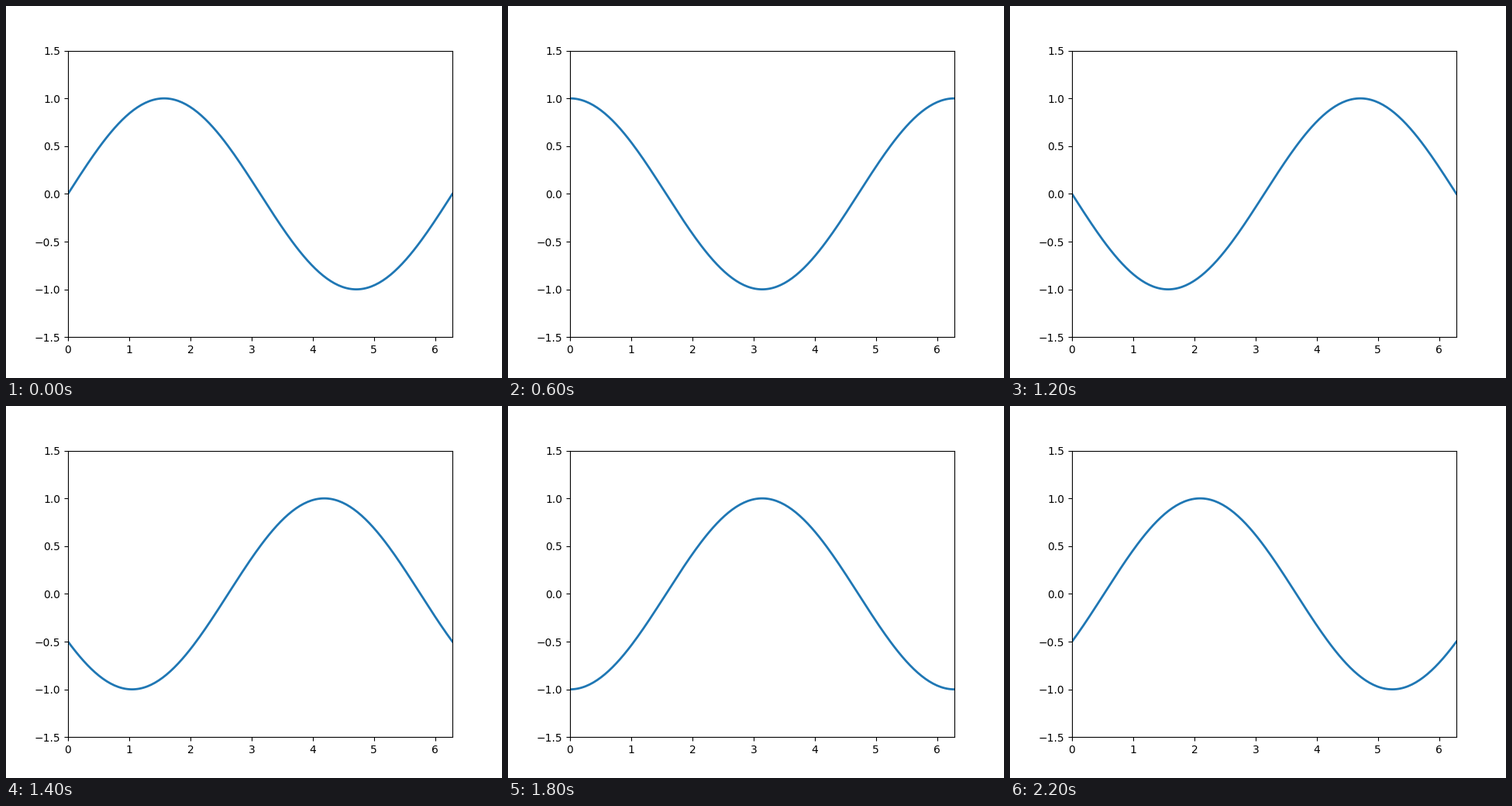
A matplotlib script that plays this animation: 640x480 px, repeating every 2400 ms.

```python
import numpy as np
import matplotlib.pyplot as plt
from matplotlib.animation import FuncAnimation

FRAMES = 12
LOOP_MS = 2400

fig, ax = plt.subplots(figsize=(6.4, 4.8), dpi=100)
ax.set_xlim(0, 2 * np.pi)
ax.set_ylim(-1.5, 1.5)

x = np.linspace(0, 2 * np.pi, 200)
line, = ax.plot(x, np.sin(x), lw=2)


def update(frame):
    phase = 2 * np.pi * frame / FRAMES
    line.set_ydata(np.sin(x + phase))
    return line,


anim = FuncAnimation(fig, update, frames=FRAMES, interval=LOOP_MS / FRAMES,
                     repeat=True, repeat_delay=0)
plt.show()
```
